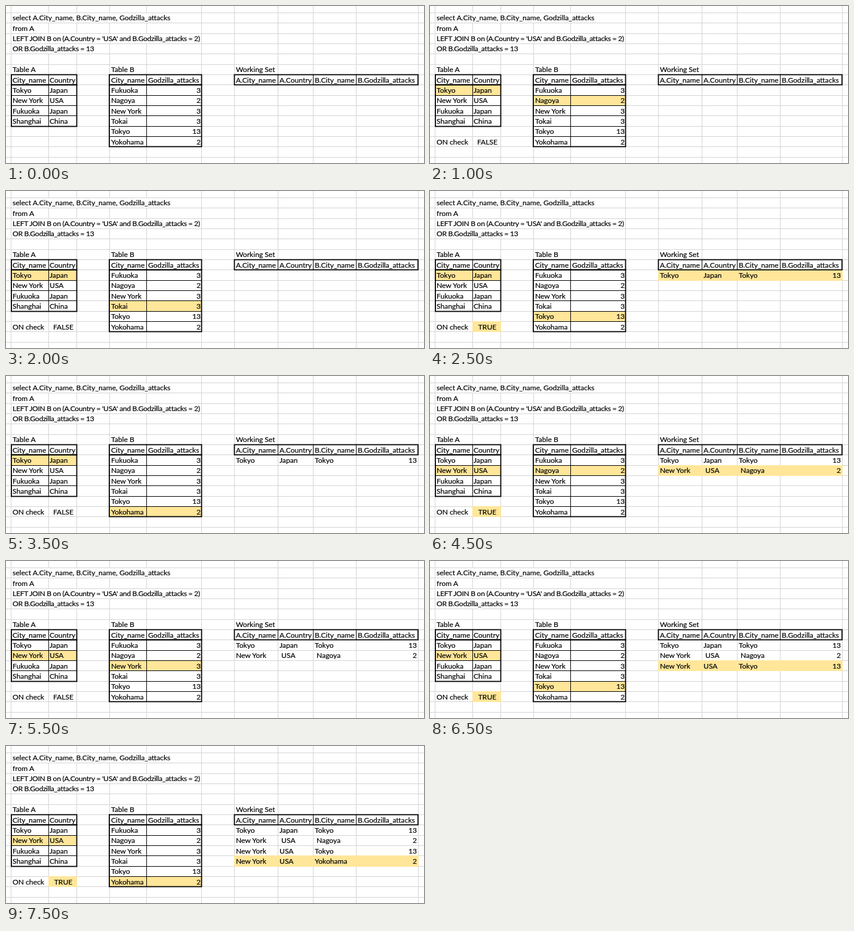
Recreate the animation shown at these times as an HTML page. Size 700 by 264 pixels, loop 8 s.

```html
<!DOCTYPE html>
<html lang="en">
<head>
<meta charset="utf-8">
<title>Left join, step by step</title>
<style>
  html, body { margin: 0; width: 100%; height: 100%; overflow: hidden; background: #fff; }
  svg { display: block; width: 700px; height: 264px; }
  text {
    font-family: Lato, Carlito, sans-serif; font-size: 12.1px; white-space: pre;
    fill: #000; stroke: #000; stroke-width: 0.2px;
  }
  .tight { letter-spacing: -0.28px; }
  .grid { stroke: #d4d4d4; stroke-width: 1; }
  .box { fill: none; stroke: #000; stroke-width: 1.8; }
  .rule { stroke: #000; stroke-width: 1; }
  .mark { fill: #ffe699; }
</style>
</head>
<body>
<svg id="stage" viewBox="0 0 700 264"></svg>
<script>
const NS = 'http://www.w3.org/2000/svg';
const stage = document.getElementById('stage');
const LOOP = 8000;
const columns = [8, 71, 118, 173, 235, 327, 382, 455, 514, 586, 690];

// Row 0 is the first data row; the headers sit in row -1.
const exactY = row => 132.85 + 17.35 * row;
const lineY = row => Math.floor(exactY(row));
const baseY = row => Math.round(exactY(row + 1) - 4.34);

function add(parent, tag, attrs) {
  const node = document.createElementNS(NS, tag);
  for (const key in attrs) node.setAttribute(key, attrs[key]);
  return parent.appendChild(node);
}

function label(parent, x, row, value, extra) {
  const node = add(parent, 'text', { x, y: baseY(row), ...extra });
  node.textContent = value;
  return node;
}

const line = (parent, x1, y1, x2, y2, cls) =>
  add(parent, 'line', { x1, y1, x2, y2, class: cls });

function cover(parent, x1, x2, row, attrs) {
  const y = lineY(row);
  return add(parent, 'rect', { x: x1, y, width: x2 - x1, height: lineY(row + 1) + 1 - y, ...attrs });
}

function frame(x1, x2, from, to, rules) {
  const top = lineY(from) + 0.5, bottom = lineY(to) + 0.5;
  for (const x of rules) line(ink, x + 0.5, top, x + 0.5, bottom, 'rule');
  for (let row = from + 1; row < to; row++) line(ink, x1, lineY(row) + 0.5, x2, lineY(row) + 0.5, 'rule');
  add(ink, 'rect', { x: x1, y: top, width: x2 - x1, height: bottom - top, class: 'box' });
}

const [grid, marks, ink] = [0, 1, 2].map(() => add(stage, 'g', {}));

// Sheet grid; long text hides the column lines it runs across.
for (const x of columns) line(grid, x + 0.5, 0, x + 0.5, 264, 'grid');
for (const [row, right] of [[-7, 320], [-5, 320], [-4, 160]]) {
  cover(grid, 10, right, row, { fill: '#fff' });
}
for (let row = -7; row < 8; row++) line(grid, 0, lineY(row) + 0.5, 700, lineY(row) + 0.5, 'grid');

// Query
label(ink, 11, -7, 'select A.City_name, B.City_name, Godzilla_attacks');
label(ink, 11, -6, 'from A');
label(ink, 11, -5, "LEFT JOIN B on (A.Country = 'USA' and B.Godzilla_attacks = 2)", { class: 'tight' });
label(ink, 11, -4, 'OR B.Godzilla_attacks = 13', { class: 'tight' });

// Tables
function table(title, xs, heads, rows, rightX) {
  label(ink, xs[0], -2, title);
  heads.forEach((head, i) => label(ink, xs[i], -1, head));
  rows.forEach((cells, row) => cells.forEach((value, i) => {
    if (typeof value === 'number') label(ink, rightX, row, value, { 'text-anchor': 'end' });
    else label(ink, xs[i], row, value);
  }));
}

table('Table A', [11, 73], ['City_name', 'Country'],
  [['Tokyo', 'Japan'], ['New York', 'USA'], ['Fukuoka', 'Japan'], ['Shanghai', 'China']]);
table('Table B', [176, 238], ['City_name', 'Godzilla_attacks'],
  [['Fukuoka', 3], ['Nagoya', 2], ['New York', 3], ['Tokai', 3], ['Tokyo', 13], ['Yokohama', 2]], 326);
table('Working Set', [385, 458, 517, 589],
  ['A.City_name', 'A.Country', 'B.City_name', 'B.Godzilla_attacks'], []);

frame(9, 118.5, -1, 0, [71]);
frame(9, 118.5, 0, 4, [71]);
frame(173, 327.5, -1, 0, [235]);
frame(173, 327.5, 0, 6, [235]);
frame(382.5, 690, -1, 0, [455, 514, 586]);

// Parts that change
const results = [
  ['Tokyo', 'Japan', 'Tokyo', 13],
  ['New York', ' USA', ' Nagoya', 2],
  ['New York', 'USA', 'Tokyo', 13],
  ['New York', 'USA', 'Yokohama', 2]
].map((cells, row) => {
  const group = add(ink, 'g', {});
  [385, 458, 517].forEach((x, i) => label(group, x, row, cells[i]));
  label(group, 688, row, cells[3], { 'text-anchor': 'end' });
  return group;
});

const markRows = (x1, x2, count) =>
  Array.from({ length: count }, (_, row) => cover(marks, x1, x2, row, { class: 'mark' }));
const marksA = markRows(9, 118, 4);
const marksB = markRows(173, 327, 6);
const marksSet = markRows(382, 691, 4);
const markCheck = cover(marks, 71, 119, 5, { class: 'mark' });

const check = add(ink, 'g', {});
label(check, 11, 5, 'ON check');
const verdict = label(check, 96, 5, '', { 'text-anchor': 'middle' });

// start time, row of A, row of B, result row added (-1: no match)
const steps = [
  [0, -1, -1, -1],
  [500, 0, 0, -1], [1000, 0, 1, -1], [1500, 0, 2, -1],
  [2000, 0, 3, -1], [2500, 0, 4, 0], [3500, 0, 5, -1],
  [4000, 1, 0, -1], [4500, 1, 1, 1], [5500, 1, 2, -1],
  [6000, 1, 3, -1], [6500, 1, 4, 2], [7500, 1, 5, 3]
];

const show = (node, on) => node.setAttribute('visibility', on ? 'visible' : 'hidden');
const pick = (nodes, index) => nodes.forEach((node, i) => show(node, i === index));

function draw(time) {
  const past = steps.filter(step => step[0] <= time);
  const [, a, b, added] = past[past.length - 1];
  const matched = added >= 0;
  const last = Math.max(...past.map(step => step[3]));
  pick(marksA, a);
  pick(marksB, b);
  pick(marksSet, added);
  results.forEach((group, i) => show(group, i <= last));
  show(markCheck, matched);
  show(check, a >= 0);
  verdict.textContent = matched ? 'TRUE' : 'FALSE';
}

const start = performance.now();
function tick() {
  draw((performance.now() - start) % LOOP);
  requestAnimationFrame(tick);
}
tick();
</script>
</body>
</html>
```
